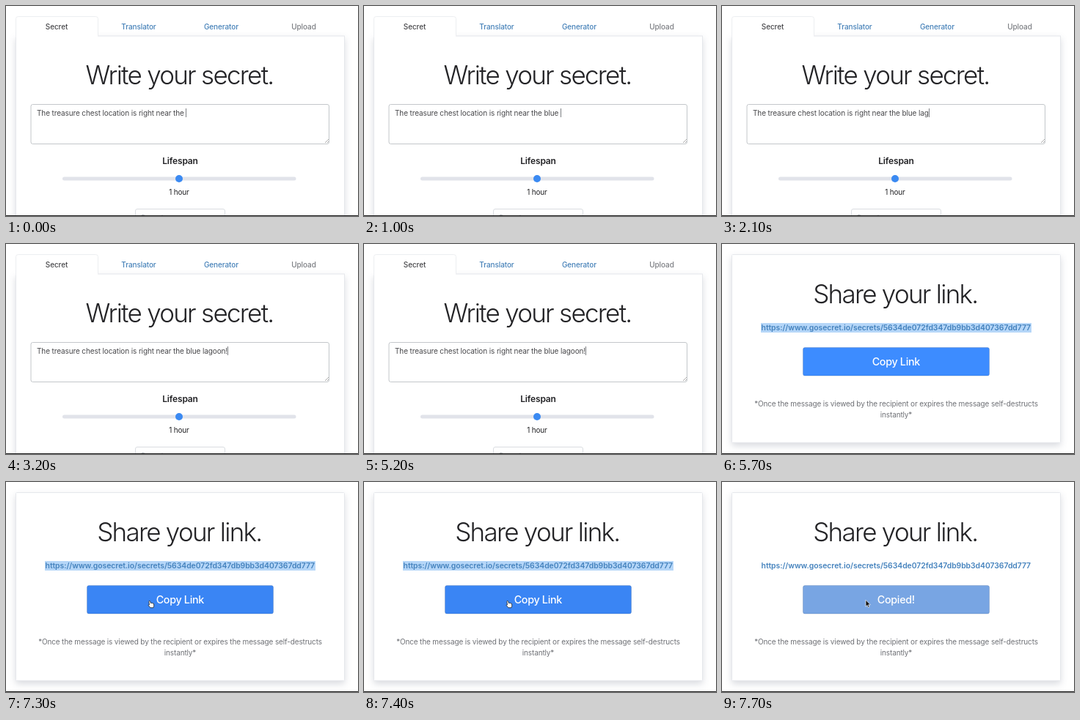
These frames come from a looping animation (480 px wide and 287 px high, 8 s). An HTML page:

```html
<!DOCTYPE html>
<html lang="en">
<head>
<meta charset="utf-8">
<title>Secret message</title>
<style>
  html, body { margin: 0; width: 100%; height: 100%; overflow: hidden; background: #fff; }
  svg { display: block; width: 480px; height: 287px; }
  text {
    font: 400 10px Inter, "Open Sans", sans-serif;
    font-optical-sizing: none;
    letter-spacing: -.18px;
    white-space: pre;
    fill: #48484b;
  }
  .mid { text-anchor: middle; }
  .title { font-size: 35px; font-weight: 300; letter-spacing: -1.73px; fill: #232326; }
  .tab { font-weight: 500; letter-spacing: -.1px; }
  .tab.go { fill: #4580b8; }
  .tab.off { fill: #7b7d82; }
  .typed { letter-spacing: -.115px; }
  .label { font-size: 12px; font-weight: 600; letter-spacing: -.15px; fill: #232326; }
  .value { fill: #232326; }
  .hint { fill: #b4b8bd; }
  .link { font-size: 10.4px; font-weight: 600; letter-spacing: -.045px; fill: #4482bd; }
  .btn { font-size: 14.3px; font-weight: 500; letter-spacing: -.3px; fill: #fff; }
  .note { letter-spacing: -.14px; fill: #6f7176; }
  .card { fill: #fff; stroke: #e6e8ec; filter: drop-shadow(0 4px 5px rgba(30, 40, 70, .17)); }
</style>
</head>
<body>
<svg viewBox="0 0 480 287">
  <rect width="480" height="287" fill="#fff"/>

  <g id="write">
    <rect class="card" x="13.500" y="41" width="448" height="270"/>
    <path d="M13.500 43V17.500q0-3 3-3H122.500q3 0 3 3V41" fill="#fff" stroke="#eceef1"/>
    <rect x="14" y="40" width="111" height="4" fill="#fff"/>
    <text class="tab mid" x="69" y="31.500">Secret</text>
    <text class="tab go mid" x="181" y="31.500">Translator</text>
    <text class="tab go mid" x="293.500" y="31.500">Generator</text>
    <text class="tab off mid" x="406" y="31.500">Upload</text>
    <text class="title mid" x="236.500" y="106.700">Write your secret.</text>

    <rect x="34" y="134.500" width="406.500" height="54" rx="2.500" fill="#fff" stroke="#c3c7ca"/>
    <path d="M435 187l5-5M438 187l2-2" stroke="#8a8a8a" stroke-width=".7"/>
    <text id="typed" class="typed" x="42" y="150"></text>
    <rect id="caret" y="140" width="1" height="12" fill="#7d8084"/>

    <text class="label mid" x="237.500" y="215.500">Lifespan</text>
    <rect x="77" y="233.500" width="318.500" height="5" rx="2.500" fill="#e1e3ea"/>
    <circle cx="236" cy="236" r="5" fill="#3b8af2"/>
    <text class="value mid" x="236" y="258">1 hour</text>
    <rect x="176.500" y="277.500" width="122" height="24" rx="2.500" fill="#fff" stroke="#dadde1"/>
    <text class="hint" x="184" y="292.800">Passphrase</text>
  </g>

  <g id="share">
    <rect class="card" x="13.500" y="14.500" width="448" height="257" rx="1"/>
    <text class="title mid" x="236.300" y="80.700">Share your link.</text>
    <rect id="marked" x="53" y="108" width="369" height="13" fill="#b5d6f8"/>
    <text class="link mid" x="237.300" y="118">https://www.gosecret.io/secrets/5634de072fd347db9bb3d407367dd777</text>
    <rect id="button" x="110.500" y="141.500" width="254" height="38.500" rx="2.500" stroke="rgba(40, 80, 140, .25)"/>
    <text id="action" class="btn mid" x="237.300" y="166"></text>
    <text class="note mid" x="237.500" y="222">*Once the message is viewed by the recipient or expires the message self-destructs</text>
    <text class="note mid" x="237.500" y="237">instantly*</text>
    <path id="arrow" d="M0 0V9L2.100 7.100 3.500 10.200 5 9.500 3.600 6.500H6.400Z" fill="#111" stroke="#fff" stroke-width=".7"/>
    <path id="hand" d="M1.200.6Q2.200 0 2.600 1L3.300 3.500Q4.200 2.900 4.700 3.600 5.500 3.100 6 3.900 7.300 3.500 7.600 4.900L7.700 7.500 6.900 9.800H2.900L.2 6.600Q-.2 5.500 1.500 5.800L.8 1.500Q.7 1 1.200.6Z"
      fill="#fff" stroke="#222" stroke-width=".8"/>
  </g>

  <rect y="286" width="480" height="1" fill="#222"/>
</svg>

<script>
const LOOP = 8000, SEND = 5600, SELECT = 5700, MOVE = 6600, STOP = 7300, CLICK = 7500;
const START = "The treasure chest location is right near the ";
const REST = "blue lagoon!";
// time at which each letter of REST appears
const KEYS = [100, 600, 800, 900, 1000, 1600, 1800, 2100, 2400, 2700, 3000, 3200];
const CARET_OFF = [[1500, 1600], [3700, 4200], [4700, 5200]];
const FADE = ["#4a8fee", "#629be9", "#78a5e3"];

const $ = id => document.getElementById(id);
const show = (id, on) => $(id).setAttribute("visibility", on ? "visible" : "hidden");
const place = (id, x, y) => $(id).setAttribute("transform", `translate(${x} ${y})`);

function drawWriting(t) {
  const count = KEYS.filter(k => k <= t).length;
  const text = START + REST.slice(0, count);
  if ($("typed").textContent !== text) $("typed").textContent = text;
  $("caret").setAttribute("x", Math.round(42 + $("typed").getComputedTextLength()));
  $("caret").setAttribute("opacity", CARET_OFF.some(([a, b]) => t >= a && t < b) ? 0 : 1);
}

function drawSharing(t) {
  const p = Math.min(1, Math.max(0, (t - MOVE) / (STOP - MOVE)));
  const ease = p * (2 - p);
  const x = -3 + 198 * ease, y = 212 - 50 * ease;
  const over = x > 110 && y < 181;
  const clicked = t >= CLICK;

  $("marked").setAttribute("opacity", t >= SELECT && !clicked ? 1 : 0);
  $("action").textContent = clicked ? "Copied!" : "Copy Link";
  $("button").setAttribute("fill",
    clicked ? FADE[Math.min(2, (t - CLICK) / 100)] : over ? "#3a85f4" : "#3d8cff");
  $("arrow").setAttribute("opacity", t >= MOVE && (clicked || !over) ? 1 : 0);
  $("hand").setAttribute("opacity", t >= MOVE && over && !clicked ? 1 : 0);
  place("arrow", x + 1, y - .7);
  place("hand", x - 1, y);
}

function draw(now) {
  const t = Math.floor(now % LOOP / 100) * 100;
  const sent = t >= SEND;
  show("write", !sent);
  show("share", sent);
  if (sent) drawSharing(t); else drawWriting(t);
}

const began = performance.now();
function tick() {
  draw(performance.now() - began);
  requestAnimationFrame(tick);
}
tick();
</script>
</body>
</html>
```
